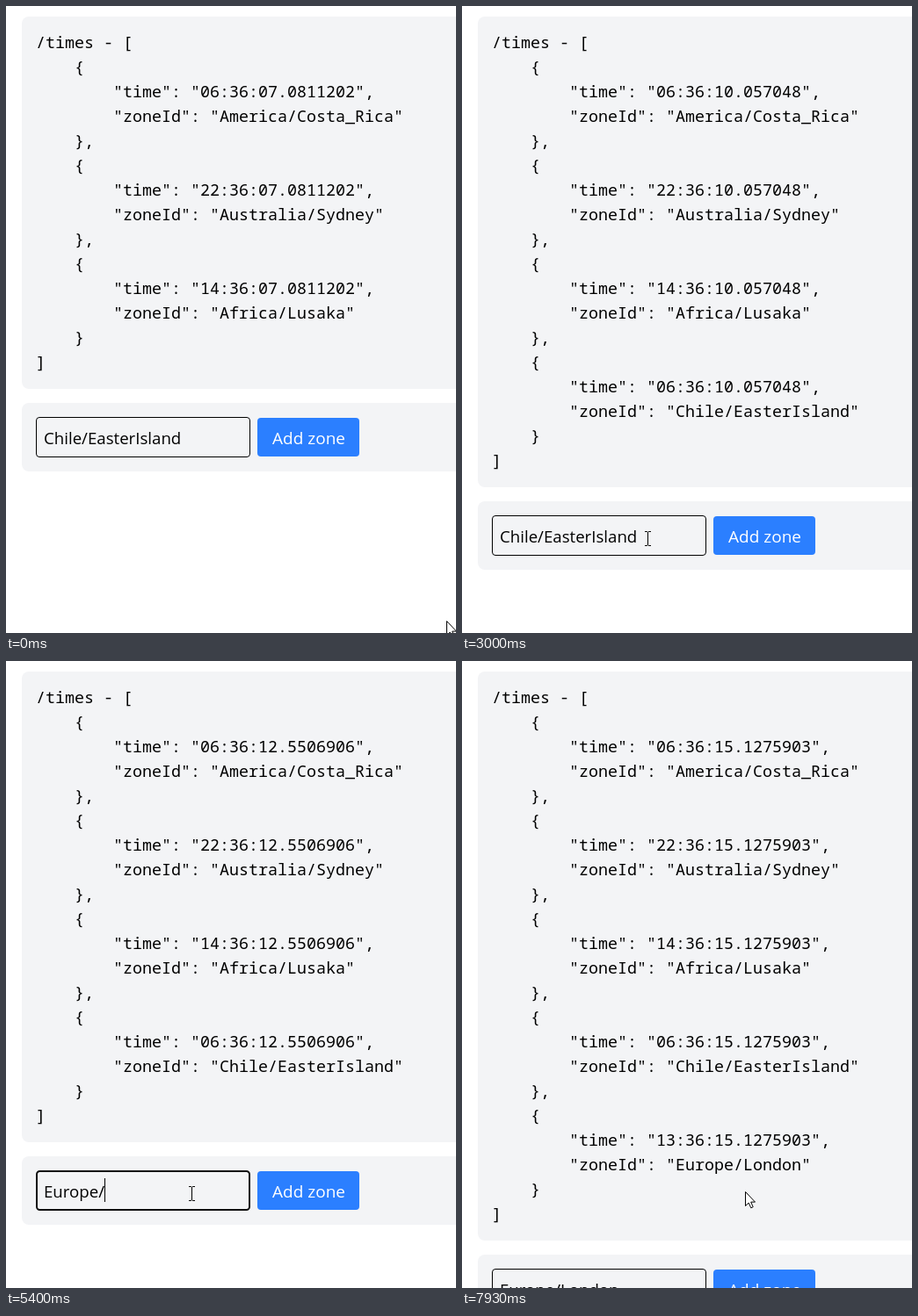
Animation, 512 px wide and 714 px high, one loop 8 s. Source, as an HTML page:

```html
<!DOCTYPE html>
<html lang="en">
<head>
<meta charset="utf-8">
<title>World times</title>
<style>
  html, body { margin: 0; width: 100%; height: 100%; overflow: hidden; background: #fff; }
  svg { display: block; }
  text { white-space: pre; }
  .json { font: 18.33px "Noto Sans Mono", monospace; }
  .ui { font: 18.65px "Open Sans", sans-serif; }
  .panel { fill: #f3f4f6; }
</style>
</head>
<body>
<svg id="stage" width="512" height="714" viewBox="0 0 512 714"></svg>
<script>
const LOOP = 8000, STEP = 200 / 3, LAST_STEP = 119;
const stage = document.getElementById('stage');

const ADD_FIRST = 34, FOCUS = 48, SELECT = 52, BLUR = 111, ADD_SECOND = 115;
const TYPED = 'Europe/London';
const KEYS = [56, 61, 66, 70, 72, 75, 78, 83, 85, 88, 91, 93, 95];
const LATE_TICKS = [68, 70, 72, 73, 75, 76, 78, 79, 81];

const ZONES = [
  ['06', 'America/Costa_Rica'], ['22', 'Australia/Sydney'], ['14', 'Africa/Lusaka'],
  ['06', 'Chile/EasterIsland'], ['13', 'Europe/London']
];

// [step, seconds]
const CLOCK = [
  [0, 7.0811202], [16, 8.1876362], [35, 9.4208374], [55, 10.8346388],
  [70, 11.743848], [92, 13.3575333], [119, 15.1275903]
];

// [step, x, y]
const POINTER = [
  [0, 501, 700], [2, 499, 674], [3, 499, 674], [5, 491, 554], [16, 491, 554],
  [27, 318, 494], [36, 318, 494], [45, 211, 606], [99, 211, 606],
  [106, 300, 620], [110, 322, 604], [119, 322, 604]
];

const linear = u => u;
const smooth = u => u * u * (3 - 2 * u);

function valueAt(track, step, ease) {
  const i = Math.max(1, track.findIndex(key => key[0] >= step));
  const from = track[i - 1], to = track[i];
  const u = ease((step - from[0]) / (to[0] - from[0]));
  return from.slice(1).map((v, k) => v + (to[k + 1] - v) * u);
}

function ticksAt(step) {
  if (step > 66 && step < 83) return LATE_TICKS.includes(step);
  return step === 0 || (step % 3 !== 0 && step !== 28);
}

function secondsAt(step) {
  while (!ticksAt(step)) step--;
  const [seconds] = valueAt(CLOCK, step, linear);
  return seconds.toFixed(7).padStart(10, '0').replace(/0+$/, '');
}

function jsonLines(step) {
  const count = step < ADD_FIRST ? 3 : step < ADD_SECOND ? 4 : 5;
  const seconds = secondsAt(step);
  const items = ZONES.slice(0, count).flatMap(([hour, zone], i) => [
    '    {',
    `        "time": "${hour}:36:${seconds}",`,
    `        "zoneId": "${zone}"`,
    i < count - 1 ? '    },' : '    }'
  ]);
  return ['/times - [', ...items, ']'];
}

function squiggle(x, y, width) {
  return `<path d="M${x} ${y}${'l2 -2l2 2'.repeat(width / 4)}" fill="none" stroke="#e33" stroke-width="1"/>`;
}

function pointerShape(x, y, overInput) {
  x = Math.round(x);
  y = Math.round(y);
  return overInput
    ? `<path transform="translate(${x} ${y})" d="M-3 -7.5h3m1 0h3M.5 -7v15M-3 8.5h3m1 0h3" fill="none" stroke="#000"/>`
    : `<path transform="translate(${x + .5} ${y + .5})" d="M0 0V16L3.7 12.6L6.3 18.3L8.7 17.2L6.2 11.6H11Z" fill="#fff" stroke="#000"/>`;
}

function draw(step) {
  const lines = jsonLines(step);
  const height = lines.length * 28 + 32;
  const formTop = height + 28, inputTop = formTop + 16, baseline = inputTop + 31;

  const typedCount = KEYS.filter(key => key <= step).length;
  const value = typedCount ? TYPED.slice(0, typedCount) : 'Chile/EasterIsland';
  const focused = step >= FOCUS && step < BLUR;
  const selected = step >= SELECT && !typedCount;
  const lastKey = typedCount ? KEYS[typedCount - 1] : FOCUS;
  const caretOn = focused && !selected && (step - lastKey) % 16 < 8;

  const border = focused ? 2 : 1;
  const [x, y] = valueAt(POINTER, step, smooth);
  const overInput = x >= 34 && x < 278 && y >= inputTop && y < inputTop + 46;

  stage.innerHTML = `
    <rect class="panel" x="18" y="12" width="600" height="${height}" rx="8"/>
    ${lines.map((line, i) => `<text class="json" xml:space="preserve" x="34" y="${48 + 28 * i}">${line}</text>`).join('')}
    <rect class="panel" x="18" y="${formTop}" width="600" height="78" rx="8"/>
    <rect x="${34 + border / 2}" y="${inputTop + border / 2}" width="${244 - border}" height="${46 - border}"
      rx="3.5" fill="none" stroke="${focused ? '#101010' : '#000'}" stroke-width="${border}"/>
    ${selected ? `<rect x="43" y="${inputTop + 9}" width="157" height="28" fill="#3367d1"/>` : ''}
    <text class="ui" id="value" x="43" y="${baseline}" fill="${selected ? '#fff' : '#000'}">${value}</text>
    ${selected ? squiggle(95, inputTop + 33, 104) : ''}
    <rect x="286" y="${inputTop + 1}" width="116" height="44" rx="4" fill="#2b7fff"/>
    <text class="ui" x="344.5" y="${baseline}" text-anchor="middle" fill="#fff" style="font-size:19px">Add zone</text>
    <rect id="caret" y="${inputTop + 9}" width="1" height="27" visibility="${caretOn ? 'visible' : 'hidden'}"/>
    ${pointerShape(x, y, overInput)}`;

  const textWidth = document.getElementById('value').getComputedTextLength();
  document.getElementById('caret').setAttribute('x', Math.floor(43 + textWidth));
}

let shown = -1;
function frame() {
  // A few ms of slack, as steps fall on times rounded to 10 ms
  const step = Math.min(LAST_STEP, Math.floor((performance.now() % LOOP + 4) / STEP));
  if (step !== shown) draw(shown = step);
  requestAnimationFrame(frame);
}
frame();
</script>
</body>
</html>
```
